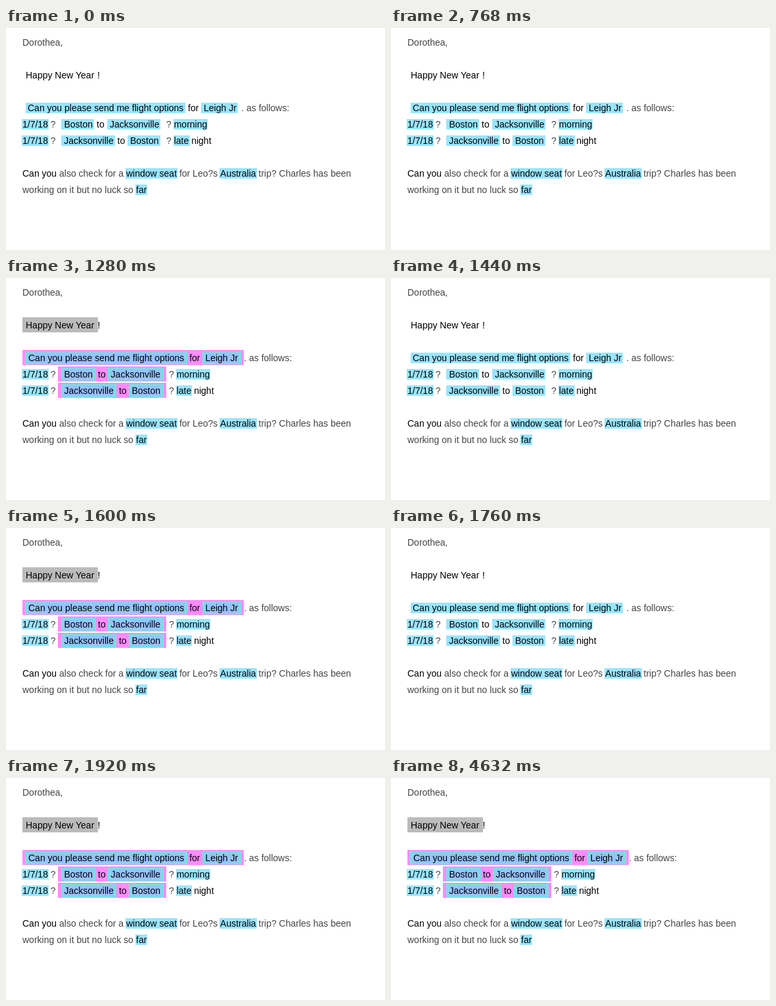
An HTML page for the animation above (6.44 s loop, 577x339 px).

```html
<!DOCTYPE html>
<html lang="en">
<head>
<meta charset="utf-8">
<title>Travel request</title>
<style>
  html, body { margin: 0; width: 100%; height: 100%; overflow: hidden; background: #fff; }
  svg { display: block; }
  text { font: 14px "Liberation Sans", Arial, sans-serif; fill: #000; white-space: pre; }
  .soft { fill: #444; }
</style>
</head>
<body>
<svg id="stage" width="577" height="339" viewBox="0 0 577 339">
  <g id="common"></g>
  <g id="plain"></g>
  <g id="marked"></g>
</svg>
<script>
const NS = "http://www.w3.org/2000/svg";
const LOOP = 6440, START = 1280, BLINK = 160, BLINKS = 5;
const BLUE = "#99e5ff", PINK = "#ff8cff", TEAL = "#7adfe0", INNER = "#97c3ff", GRAY = "#bbb";
const common = document.getElementById("common");
const plain = document.getElementById("plain");
const marked = document.getElementById("marked");

function add(parent, tag, attrs) {
  const el = document.createElementNS(NS, tag);
  for (const key in attrs) el.setAttribute(key, attrs[key]);
  return parent.appendChild(el);
}

// y is always the text baseline
function write(g, x, y, text, cls = "") {
  add(g, "text", { x, y, class: cls }).textContent = text;
}
const soft = (g, x, y, text) => write(g, x, y, text, "soft");

function bar(g, left, right, y, fill, top = 13, bottom = 3) {
  add(g, "rect", { x: left, y: y - top, width: right - left, height: top + bottom, fill });
}
const block = (left, right, y, fill) => bar(marked, left, right, y, fill, 17, 6);

function chip(g, left, right, x, y, text) {
  bar(g, left, right, y, BLUE);
  write(g, x, y, text);
}

function nested(left, right, x, y, text) {
  bar(marked, left, right, y, TEAL, 15, 5);
  bar(marked, left + 4, right - 4, y, INNER);
  write(marked, x, y, text);
}

// Parts that never change
soft(common, 25, 27, "Dorothea,");
for (const y of [152, 177]) {
  chip(common, 24, 65, 25, y, "1/7/18");
  soft(common, 67.8, y, "?");
}
write(common, 25, 227, "Can you");
soft(common, 81, 227, "also check for a");
chip(common, 182, 261, 183, 227, "window seat");
soft(common, 263.9, 227, "for Leo?s");
chip(common, 325, 382, 326.1, 227, "Australia");
soft(common, 384.5, 227, "trip? Charles has been");
soft(common, 25, 252, "working on it but no luck so");
chip(common, 197, 215, 198, 252, "far");

// Before markup
write(plain, 30, 77, "Happy New Year");
write(plain, 139, 77, "!");
chip(plain, 30, 273, 33, 127, "Can you please send me flight options");
write(plain, 277, 127, "for");
chip(plain, 297, 353, 301, 127, "Leigh Jr");
soft(plain, 358.2, 127, ". as follows:");
chip(plain, 84, 134, 88.5, 152, "Boston");
write(plain, 138, 152, "to");
chip(plain, 154, 235, 158, 152, "Jacksonville");
chip(plain, 255, 307, 255.7, 152, "morning");
chip(plain, 84, 166, 88.2, 177, "Jacksonville");
write(plain, 169.6, 177, "to");
chip(plain, 185, 235, 189, 177, "Boston");
chip(plain, 255, 280, 255.7, 177, "late");
write(plain, 282.2, 177, "night");

// With markup
block(25, 140, 77, GRAY);
write(marked, 30, 77, "Happy New Year");
write(marked, 139.6, 77, "!");
block(25, 362, 127, PINK);
nested(29, 276, 34, 127, "Can you please send me flight options");
write(marked, 279.2, 127, "for");
nested(299, 358, 303.4, 127, "Leigh Jr");
soft(marked, 362.2, 127, ". as follows:");
block(79, 244, 152, PINK);
nested(84, 137, 88.5, 152, "Boston");
write(marked, 140, 152, "to");
nested(155, 240, 159.6, 152, "Jacksonville");
chip(marked, 259, 311, 259.7, 152, "morning");
block(79, 244, 177, PINK);
nested(84, 168, 88.5, 177, "Jacksonville");
write(marked, 171.9, 177, "to");
nested(187, 240, 191.4, 177, "Boston");
chip(marked, 259, 283, 259.7, 177, "late");
write(marked, 286.2, 177, "night");

for (const y of [152, 177]) {
  soft(plain, 244, y, "?");
  soft(marked, 248, y, "?");
}

function draw(t) {
  const step = Math.min(BLINKS, Math.floor((t - START) / BLINK) + 1);
  const on = step > 0 && step % 2 === 1;
  plain.setAttribute("display", on ? "none" : "inline");
  marked.setAttribute("display", on ? "inline" : "none");
}

const begin = performance.now();
function tick() {
  draw((performance.now() - begin) % LOOP);
  requestAnimationFrame(tick);
}
draw(0);
requestAnimationFrame(tick);
</script>
</body>
</html>
```
